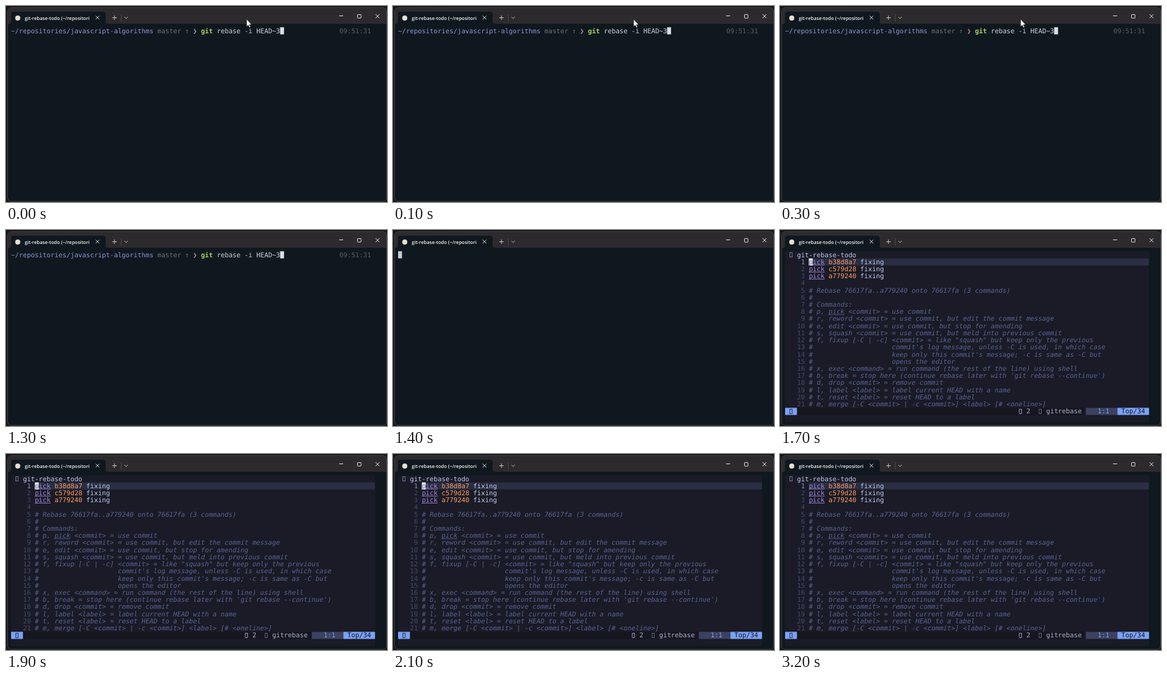
Recreate the animation shown at these times as an HTML page. Size 600 px wide and 309 px high, loop 3300 ms.

```html
<!DOCTYPE html>
<html lang="en">
<head>
<meta charset="utf-8">
<title>Interactive rebase</title>
<style>
  html, body { margin: 0; width: 100%; height: 100%; overflow: hidden; background: #161518; }
  svg { display: block; width: 600px; height: 309px; }
  text { white-space: pre; text-rendering: geometricPrecision; }
  .term text { font: 10.35px "DejaVu Sans Mono", "DejaVu Sans", monospace; }
  .term .bold { font-weight: bold; }
  .term .italic { font-style: italic; }
  .title { font: 600 7.5px "Open Sans", "Noto Sans", sans-serif; fill: #f4f4f4; }
  .icons { fill: none; stroke: #dedede; stroke-width: 1; }
</style>
</head>
<body>
<svg viewBox="0 0 600 309" xmlns="http://www.w3.org/2000/svg">
  <defs><clipPath id="titleClip"><rect x="28" y="10" width="104" height="17"/></clipPath></defs>
  <rect width="600" height="309" fill="#161518"/>
  <rect x="2.5" y="2.5" width="597" height="305.5" rx="6" fill="#0f181e"/>
  <path d="M3 28V9Q3 3 9 3H593Q599 3 599 9V28Z" fill="#2d2a2d"/>
  <path d="M5 28Q8 28 8 25V13Q8 9 12 9H153Q157 9 157 13V25Q157 28 160 28Z" fill="#0f181e"/>
  <rect x="2.5" y="2.5" width="597" height="305.5" rx="6" fill="none" stroke="#444246"/>
  <circle cx="18.5" cy="19" r="4" fill="#e4dfd2"/>
  <text class="title" x="29.5" y="21.8" clip-path="url(#titleClip)">git-rebase-todo (~/repositori</text>
  <g class="icons">
    <path d="M141.3 15.5l5.6 5.6m0-5.6l-5.6 5.6"/>
    <path d="M167.3 18.5h7M170.8 15v7" stroke="#c4c4c4"/>
    <path d="M181.5 13v11" stroke="#4c494c"/>
    <path d="M186.7 17.3l2.5 2.5l2.5-2.5" stroke="#c4c4c4"/>
    <path d="M524.5 15.5h6.5"/>
    <rect x="553.5" y="13.5" width="5.6" height="5.6" rx=".6"/>
    <path d="M582 13.2l6 6m0-6l-6 6"/>
  </g>
  <g class="term">
    <g id="shell"></g>
    <g id="editor"></g>
    <rect id="caret" width="6.2" height="11.2"/>
    <g id="caretLetter"></g>
  </g>
  <path id="mouse" d="M379 21V32.2L381.5 29.9L383.4 34L385 33.2L383.2 29.3H386.6Z"
    fill="#fff" stroke="#222" stroke-width=".5"/>
</svg>
<script>
const LOOP = 3300, POINTER_GONE = 1300, CLEARED = 1400, EDITOR_OPEN = 1700, CARET_OFF = 3200;
const LEFT = 8, TOP = 33.5, COL = 6.23, ROW = 11.22;
const NS = "http://www.w3.org/2000/svg";
const $ = id => document.getElementById(id);
const shell = $("shell"), editor = $("editor");
const colX = col => LEFT + col * COL;
const rowY = row => TOP + row * ROW;

function add(parent, tag, attrs, content = "") {
  const node = document.createElementNS(NS, tag);
  for (const key in attrs) node.setAttribute(key, attrs[key]);
  node.textContent = content;
  return parent.appendChild(node);
}
const write = (parent, col, row, content, fill, style = "") =>
  add(parent, "text", { x: colX(col), y: rowY(row) + 9, fill, class: style }, content);
const block = (col, row, cols, rows, fill) =>
  add(editor, "rect", { x: colX(col), y: rowY(row), width: cols * COL, height: rows * ROW, fill });
const underline = (col, row, cols, fill) =>
  add(editor, "rect", { x: colX(col), y: rowY(row) + 10, width: cols * COL, height: .8, fill });
const emptyGlyph = (col, row, stroke) =>
  add(editor, "rect", { x: colX(col) + 1.3, y: rowY(row) + 2.3, width: 3.6, height: 6.8,
    fill: "none", stroke, "stroke-width": .8 });

// Shell prompt
const path = write(shell, 0, 0, "~/repositories/javascript-algorithms", "#8e92d8");
write(shell, 37, 0, "master ↑", "#6c7278");
const arrow = write(shell, 46, 0, "❯", "#a9a3c6");
write(shell, 48, 0, "git", "#a8d468", "bold");
write(shell, 52, 0, "rebase -i HEAD~3", "#cdd5d6");
write(shell, 83, 0, "09:51:31", "#596065");

// Editor
const FG = "#c0caf5", COMMENT = "#5a6394", BLUE = "#7aa2f7", PURPLE = "#a487dd";
const indent = " ".repeat(19);
const comments = [
  "Rebase 76617fa..a779240 onto 76617fa (3 commands)",
  "",
  "Commands:",
  "p, pick <commit> = use commit",
  "r, reword <commit> = use commit, but edit the commit message",
  "e, edit <commit> = use commit, but stop for amending",
  "s, squash <commit> = use commit, but meld into previous commit",
  "f, fixup [-C | -c] <commit> = like \"squash\" but keep only the previous",
  indent + "commit's log message, unless -C is used, in which case",
  indent + "keep only this commit's message; -c is same as -C but",
  indent + "opens the editor",
  "x, exec <command> = run command (the rest of the line) using shell",
  "b, break = stop here (continue rebase later with 'git rebase --continue')",
  "d, drop <commit> = remove commit",
  "l, label <label> = label current HEAD with a name",
  "t, reset <label> = reset HEAD to a label",
  "m, merge [-C <commit> | -c <commit>] <label> [# <oneline>]"
];

block(0, 0, 92, 24, "#1a1b26");
block(6, 1, 86, 1, "#292e42");
emptyGlyph(1, 0, "#8b92b8");
write(editor, 3, 0, "git-rebase-todo", FG);
for (let line = 1; line <= 21; line++)
  write(editor, 3, line, String(line).padStart(2), line === 1 ? "#8a90b5" : "#444a6c");

["b38d8a7", "c579d28", "a779240"].forEach((hash, i) => {
  write(editor, 6, i + 1, "pick", PURPLE);
  underline(6, i + 1, 4, PURPLE);
  write(editor, 11, i + 1, hash, "#ff9e64");
  write(editor, 19, i + 1, "fixing", FG);
});
comments.forEach((line, i) => write(editor, 6, i + 5, "# " + line, COMMENT, "italic"));
underline(11, 8, 4, COMMENT);

// Status line
block(0, 22, 92, 1, "#16161e");
block(0, 22, 3, 1, BLUE);
block(76, 22, 8, 1, "#3b4261");
block(84, 22, 8, 1, BLUE);
emptyGlyph(1, 22, "#15161e");
emptyGlyph(59, 22, "#a9b1d6");
write(editor, 61, 22, "2", "#a9b1d6");
emptyGlyph(64, 22, "#6d7494");
write(editor, 66, 22, "gitrebase", "#a9b1d6");
write(editor, 79, 22, "1:1", BLUE);
write(editor, 85, 22, "Top/34", "#15161e");

write($("caretLetter"), 6, 1, "p", "#77739a");

const show = (node, on) => node.style.display = on ? "" : "none";

function render(t) {
  const editing = t >= EDITOR_OPEN, prompting = t < CLEARED, caretOn = t < CARET_OFF;
  show(shell, prompting);
  show(editor, editing);
  show($("mouse"), t < POINTER_GONE);
  show($("caret"), caretOn);
  show($("caretLetter"), editing && caretOn);

  $("caret").setAttribute("x", colX(prompting ? 68 : editing ? 6 : 0));
  $("caret").setAttribute("y", rowY(editing ? 1 : 0));
  $("caret").setAttribute("fill", prompting ? "#d9dfdf" : editing ? "#e6e8f2" : "#c4cccc");
  path.setAttribute("fill", t < 100 ? "#9793d6" : "#8c93da");
  arrow.setAttribute("fill", t < 100 ? "#a9a3c6" : "#c98a9e");
}

const start = performance.now();
function tick() {
  render((performance.now() - start) % LOOP);
  requestAnimationFrame(tick);
}
tick();
</script>
</body>
</html>
```
